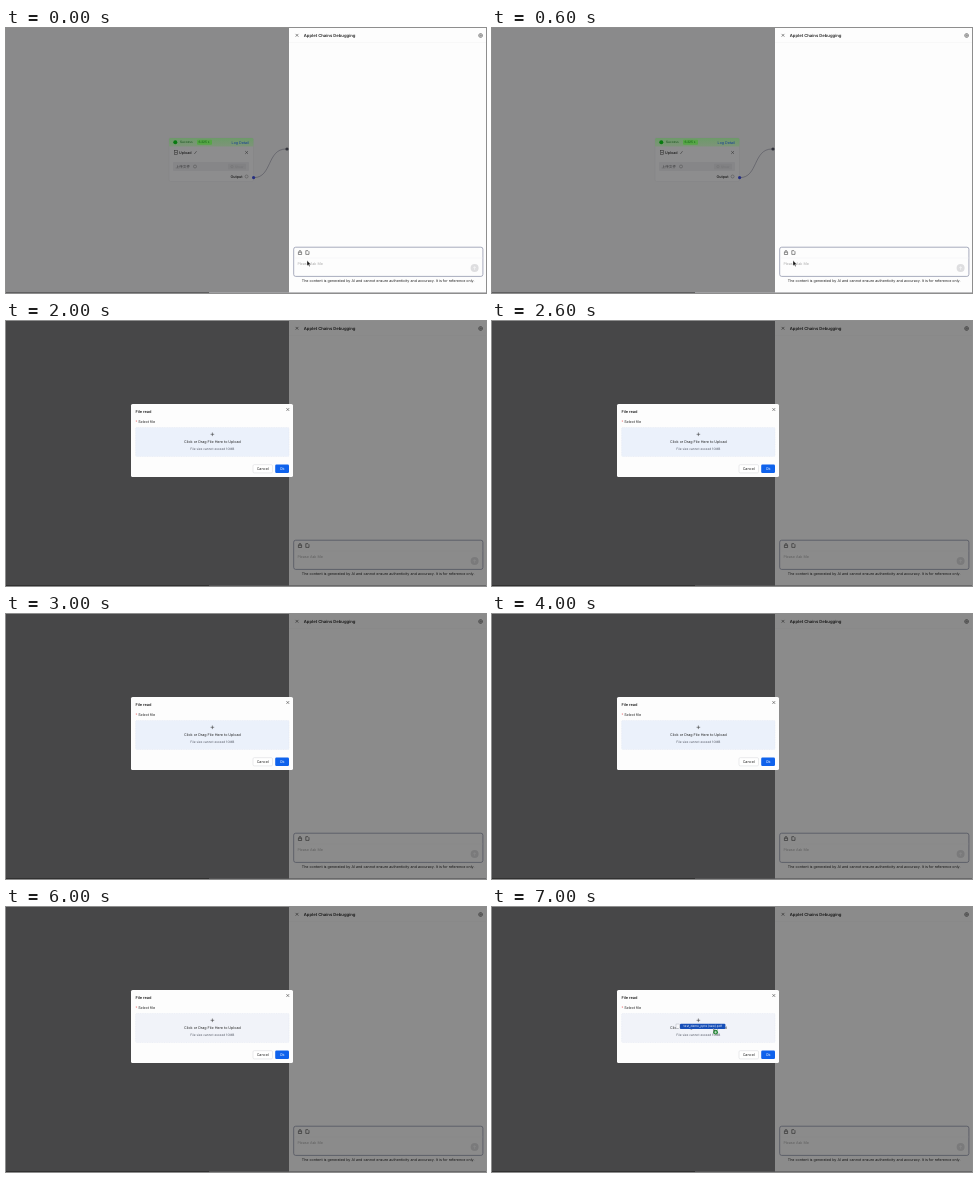
An HTML page that plays this animation: 480 px wide and 265 px high, repeating every 8000 ms.

```html
<!DOCTYPE html>
<html lang="en">
<head>
<meta charset="utf-8">
<title>File upload dialog</title>
<style>
  html, body { margin: 0; width: 100%; height: 100%; overflow: hidden; background: #8a8a8b; }
  svg { display: block; width: 100vw; height: 100vh; }
  text { font: 3.66px Inter, "Noto Sans CJK SC", "Noto Sans CJK", sans-serif; fill: #222; text-rendering: geometricPrecision; }
  .semi { font-weight: 600; }
  .title { font-size: 4.2px; }
  .small { font-size: 3.17px; }
  .mid { text-anchor: middle; }
  .line { fill: none; stroke: #333; stroke-width: .55; }
</style>
</head>
<body>
<svg viewBox="0 0 480 265">
  <defs>
    <linearGradient id="ok" x2="0" y2="1">
      <stop stop-color="#6d9a69"/>
      <stop offset="1" stop-color="#7d9479"/>
    </linearGradient>
    <path id="x" class="line" d="M-1.4-1.4 1.4 1.4M1.4-1.4-1.4 1.4"/>
    <path id="arrow" d="M0 0V5.2L1.3 4.1 2.2 6 3.1 5.6 2.2 3.8H3.9Z" fill="#111" stroke="#fff" stroke-width=".35"/>
  </defs>

  <!-- canvas with the upload node -->
  <rect width="480" height="265" fill="#8a8a8b"/>
  <rect x="163" y="110" width="84.5" height="43.5" rx="1.5" fill="#8d8d8e" stroke="#838384" stroke-width=".5"/>
  <path d="M163 118.5V111.5Q163 110 164.5 110H246Q247.5 110 247.5 111.5V118.5Z" fill="url(#ok)"/>
  <circle cx="169.3" cy="114.2" r="2" fill="#087a10"/>
  <text x="174" y="115.4" class="small" style="fill:#124d18">Success</text>
  <rect x="191" y="111.7" width="15" height="5" rx="1" fill="#56a646"/>
  <text x="192.4" y="115.3" class="small" style="fill:#0b5a10">6.225 s</text>
  <text x="225.6" y="115.5" style="fill:#123d96">Log Detail</text>
  <rect x="168.3" y="122.7" width="3.4" height="3.6" class="line"/>
  <path d="M169 124.5H171" class="line"/>
  <text x="173" y="125.8" class="semi">Upload</text>
  <path d="M188.3 126 190.6 123.2" class="line" stroke-width="1"/>
  <use href="#x" x="240.6" y="124.5"/>
  <rect x="167" y="134" width="76" height="9" rx="1" fill="#868688"/>
  <text x="169.5" y="140" style="fill:#3c3c3e">上传文件</text>
  <circle cx="189" cy="138.5" r="1.5" class="line" style="stroke:#555"/>
  <rect x="222" y="135.8" width="18" height="5.6" rx="1" fill="#818183"/>
  <circle cx="226" cy="138.6" r="1.2" class="line" style="stroke:#737375"/>
  <text x="229" y="139.8" class="small" style="fill:#737375">Show</text>
  <text x="224.4" y="149.8" class="semi">Output</text>
  <circle cx="240.6" cy="148.5" r="1.5" class="line" style="stroke:#555"/>
  <path d="M248 149.6C266 149.6 261 121 280 121" class="line" style="stroke:#50505a"/>
  <circle cx="247.6" cy="149.6" r="1.6" fill="#252e80"/>
  <circle cx="281" cy="121" r="1.6" fill="#33343c"/>

  <!-- drawer -->
  <rect x="283" width="197" height="265" fill="#fdfdfd"/>
  <path d="M283 14.5H480" stroke="#f3f3f3" stroke-width=".5"/>
  <use href="#x" x="291" y="7.3"/>
  <text x="297.8" y="8.9" class="title semi">Applet Chains Debugging</text>
  <circle cx="474.6" cy="7.5" r="1.9" class="line"/>
  <circle cx="474.6" cy="7.5" r=".7" class="line"/>
  <rect x="287.7" y="219.2" width="189.2" height="29.2" rx="2" fill="#fdfdfd" stroke="#9498ae" stroke-width=".8"/>
  <path d="M288 230H476.6" stroke="#ededf0" stroke-width=".5"/>
  <path d="M292.4 224.2H295.6V226.5H292.4ZM293 224.2V223.5A1 1 0 0 1 295 223.5V224.2" class="line"/>
  <path d="M299.8 222.7H302L303 223.7V226.4H299.8Z" class="line"/>
  <text x="291.4" y="237.3" style="fill:#aaa">Please Ask Me</text>
  <circle cx="468.6" cy="240" r="4" fill="#dedee0"/>
  <path d="M467.2 240.2 468.6 238.7 470 240.2M468.6 238.7V241.8" class="line" style="stroke:#fff"/>
  <text x="382.2" y="254.2" class="mid">The content is generated by AI and cannot ensure authenticity and accuracy. It is for reference only.</text>
  <path d="M0 264.6H203" stroke="#505052" stroke-width=".8"/>
  <path d="M203 264.6H480" stroke="#a8a8aa" stroke-width=".8"/>
  <use id="pointer" href="#arrow"/>

  <!-- dialog -->
  <g id="dialog">
    <rect width="480" height="265" opacity=".45"/>
    <rect width="283" height="265" opacity=".07"/>
    <rect x="125" y="83" width="162" height="73" rx="1.6" fill="#fdfdfd"/>
    <text x="129.6" y="91.6" class="semi" style="font-size:3.85px">File read</text>
    <use href="#x" x="281.8" y="88.5"/>
    <text x="129.6" y="102.4" style="fill:#e5484d">*</text>
    <text x="132.2" y="102.4">Select file</text>
    <rect id="zone" x="129.6" y="106.5" width="153.4" height="29" rx="1" stroke="#dfe4ef" stroke-width=".4" stroke-dasharray="1 .7"/>
    <path d="M204.6 113.3H208.2M206.4 111.5V115.1" class="line"/>
    <text x="206.4" y="122" class="mid">Click or Drag File Here to Upload</text>
    <text x="206.3" y="129" class="mid small" style="fill:#555a66">File size cannot exceed 10MB</text>
    <rect x="247" y="143.7" width="19.5" height="8.2" rx="1.2" fill="#fff" stroke="#d5d6da" stroke-width=".5"/>
    <text x="256.7" y="149.1" class="mid">Cancel</text>
    <rect x="269.2" y="143.5" width="13.8" height="8.5" rx="1.2" fill="#0f62ec"/>
    <text x="276.1" y="149.1" class="mid" style="fill:#fff">Ok</text>
    <g id="drag">
      <rect x="184" y="117" width="3.2" height="4.6" fill="#f7f8fb" stroke="#8a8f9c" stroke-width=".3"/>
      <rect x="188" y="116.8" width="45.4" height="5.2" rx="1" fill="#174fb8"/>
      <text x="210.7" y="120.4" class="mid small" style="fill:#fff">test_demo_pptx (raw).pdf</text>
      <use href="#arrow" x="221.4" y="121.6"/>
      <circle cx="223.6" cy="125.2" r="2.4" fill="#2c8a3c"/>
      <path d="M222.3 125.2H224.9M223.6 123.9V126.5" class="line" style="stroke:#fff"/>
    </g>
  </g>
</svg>
<script>
const LOOP = 8000;
const el = id => document.getElementById(id);
const show = (id, on) => el(id).setAttribute("visibility", on ? "inherit" : "hidden");

function draw(now) {
  const t = now % LOOP;
  const open = t >= 2000;
  el("dialog").style.display = open ? "" : "none";
  el("pointer").setAttribute("transform", `translate(301 ${t < 1000 ? 232.6 : 224.2})`);
  show("pointer", !open);
  el("zone").setAttribute("fill", t < 6000 ? "#ebf1fb" : "#f1f3f9");
  show("drag", t >= 7000);
  requestAnimationFrame(draw);
}
draw(performance.now());
</script>
</body>
</html>
```
